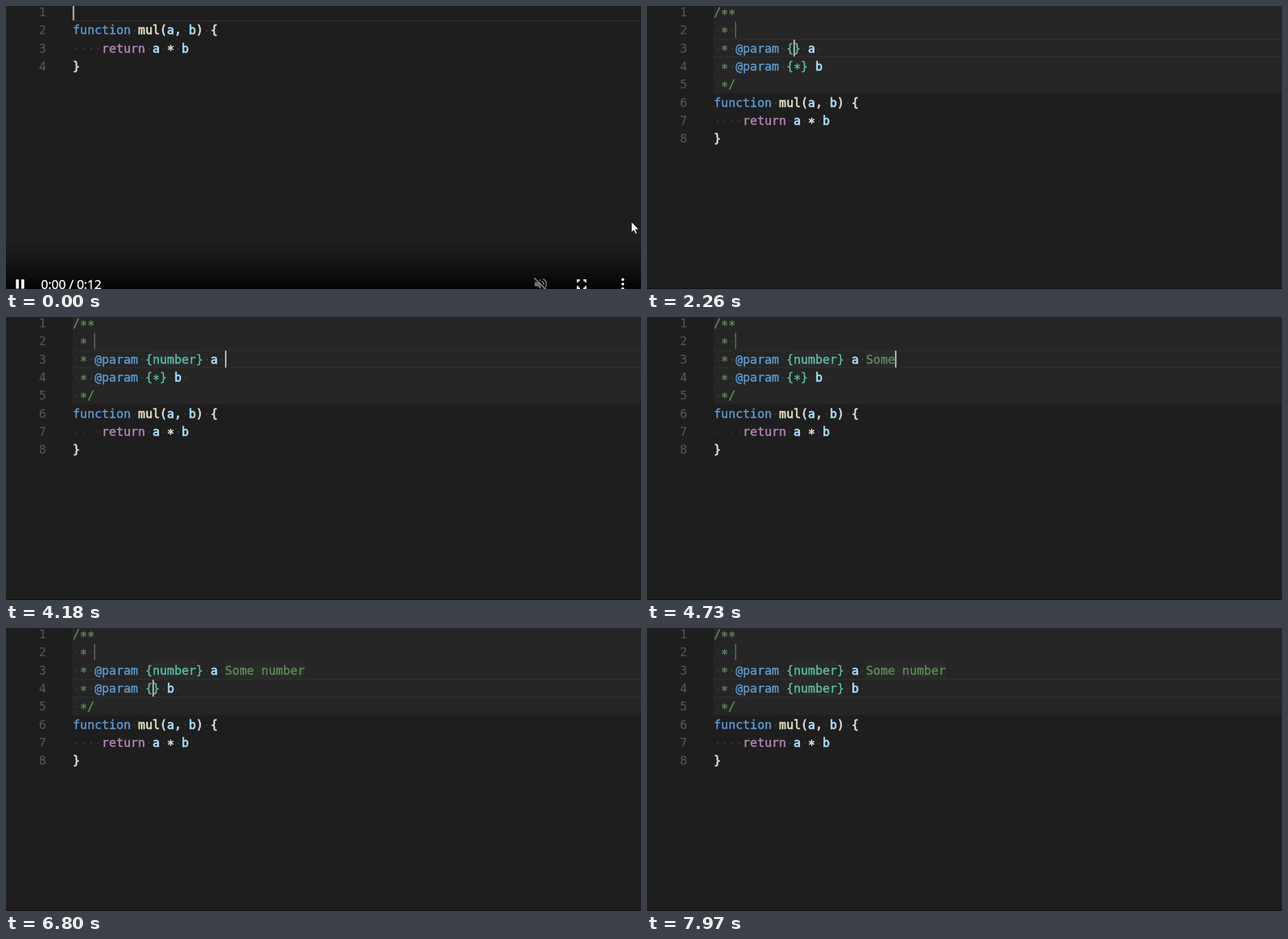
Recreate the animation shown at these times as an HTML page with a canvas. Size 925 by 412 pixels, loop 8000 ms.

```html
<!DOCTYPE html>
<html lang="en">
<head>
<meta charset="utf-8">
<title>Typing a doc comment</title>
<style>
  html, body { margin: 0; width: 100%; height: 100%; overflow: hidden; background: #1e1e1e; }
  canvas { display: block; }
</style>
</head>
<body>
<canvas id="stage" width="925" height="412"></canvas>
<script>
const W = 925, H = 412, LOOP = 8000;
const LEFT = 97, CELL = 10.56, ROW = 26.35, TOP = -4.7;
const MONO = '17.5px "DejaVu Sans Mono", monospace';
const COLOR = {
  key: '#5c97cc', fn: '#dadac0', name: '#a6d8f4', plain: '#d4d4d4', ret: '#af84ae',
  doc: '#5f8757', type: '#5bb8a2', dot: '#404040', num: '#535355',
  label: '#bfbfc2', hit: '#3499d6', blue: '#86bde6', grey: '#8e8e91'
};
const LIST = [
  ['link', 'SVGAnimatedEnumeration'], ['link', 'SVGAnimatedNumber'],
  ['link', 'SVGAnimatedNumberList'], ['link', 'SVGNumber'], ['link', 'SVGNumberList'],
  ['word', 'continue'], ['word', 'enum'], ['cube', 'menubar'], ['word', 'null', 'null'],
  ['word', 'number', 'number'], ['cube', 'oncontextmenu'], ['cube', 'onunload']
];
// Moments of a key press; the caret blink restarts at each.
const KEYS = [0, 220, 320, 420, 1120, 1720, 2200, 2700, 2840, 3220, 3540, 3950, 4330, 4660,
  4970, 5350, 5540, 6090, 6450, 6990, 7110, 7350, 7460];

const ctx = document.getElementById('stage').getContext('2d');
const lineTop = i => TOP + i * ROW;
const colX = c => LEFT + c * CELL;
const between = (t, a, b) => t >= a && t < b;
const ramp = (t, a, b) => Math.min(1, Math.max(0, (t - a) / (b - a)));
const typed = (t, text, start, gap) =>
  text.slice(0, Math.max(0, Math.floor((t - start) / gap) + 1));

function rect(x, y, w, h, fill) {
  ctx.fillStyle = fill;
  ctx.fillRect(x, y, w, h);
}

function shape(points, fill, stroke) {
  ctx.beginPath();
  points.forEach(([x, y]) => ctx.lineTo(x, y));
  ctx.closePath();
  ctx.fillStyle = fill;
  ctx.fill();
  if (stroke) {
    ctx.strokeStyle = stroke;
    ctx.lineWidth = 1;
    ctx.stroke();
  }
}

function disc(x, y, r, fill) {
  ctx.beginPath();
  ctx.arc(x, y, r, 0, Math.PI * 2);
  ctx.fillStyle = fill;
  ctx.fill();
}

// Text on the character grid; weight is a thin outline for brighter tokens.
function put(text, x, base, color, weight = 0.5, dots = false) {
  ctx.font = MONO;
  ctx.lineWidth = weight;
  ctx.lineJoin = 'round';
  [...text].forEach((ch, i) => {
    const cx = x + i * CELL;
    if (ch === ' ') {
      if (dots) rect(cx + 4.5, base - 6.4, 2, 2, COLOR.dot);
      return;
    }
    const y = base + (ch === '*' ? 2.6 : 0);
    ctx.fillStyle = ctx.strokeStyle = color;
    ctx.fillText(ch, cx, y);
    ctx.strokeText(ch, cx, y);
  });
}

function paramLine(type, name, note = '') {
  return [['doc', ' * '], ['key', '@param'], ['doc', ' '], ['type', `{${type}}`],
    ['doc', ' '], ['name', name], ['doc', ' ' + note]];
}

function codeLines() {
  return [
    [['key', 'function'], ['plain', ' '], ['fn', 'mul'], ['plain', '('], ['name', 'a'],
      ['plain', ', '], ['name', 'b'], ['plain', ') {']],
    [['plain', '    '], ['ret', 'return'], ['plain', ' '], ['name', 'a'], ['plain', ' * '], ['name', 'b']],
    [['plain', '}']]
  ];
}

function drawLine(tokens, i) {
  const base = lineTop(i) + 19.6;
  let col = 0;
  for (const [kind, text] of tokens) {
    const bright = kind === 'name' || kind === 'plain' || kind === 'fn';
    put(text, colX(col) + 0.3, base, COLOR[kind], bright ? 0.85 : 0.5, true);
    col += text.length;
  }
  put(String(i + 1), 48, base, COLOR.num, 0.2);
}

function icon(kind, x, y) {
  if (kind === 'link') {
    disc(x + 2.5, y, 2.5, COLOR.blue);
    rect(x + 5, y - 1, 6, 2, COLOR.blue);
    ctx.strokeStyle = COLOR.blue;
    ctx.lineWidth = 2.2;
    ctx.beginPath();
    ctx.arc(x + 13.5, y, 2.9, 0, Math.PI * 2);
    ctx.stroke();
  } else if (kind === 'word') {
    [[0, -7, 10], [13, -7, 4], [0, -3, 6], [9, -3, 4], [0, 1, 11], [13, 1, 5], [0, 5, 6], [9, 5, 8]]
      .forEach(([dx, dy, w]) => rect(x - 1 + dx, y + dy, w, 2, COLOR.grey));
  } else if (kind === 'cube') {
    shape([[x, y - 2], [x + 9, y - 7], [x + 18, y - 3], [x + 8, y + 2]], '#a3d3f2');
    shape([[x, y - 1], [x + 8, y + 3], [x + 8, y + 8], [x, y + 4]], '#79b6de');
    shape([[x + 9, y + 3], [x + 18, y - 2], [x + 18, y + 3], [x + 9, y + 8]], '#8fc6e9');
  } else {
    ctx.strokeStyle = COLOR.label;
    ctx.lineWidth = 1.5;
    ctx.strokeRect(x + 0.5, y - 6.5, 16, 13);
    ctx.fillStyle = COLOR.label;
    ctx.font = 'bold 8px "Liberation Sans", sans-serif';
    ctx.fillText('abc', x + 2, y + 3);
  }
}

function popup(x, y, rows, selected, match, scroll) {
  const w = 643.5, rh = 26.4, h = rows.length * rh + 2;
  rect(x, y, w, h, '#414144');
  rect(x + 1, y + 1, w - 2, h - 2, '#2b2a2e');
  rows.forEach(([kind, label, detail], i) => {
    const top = y + 1 + i * rh, base = top + 19.4;
    if (i === selected) rect(x + 1, top, w - 2, rh, '#103352');
    icon(kind, x + 6, top + rh / 2);
    const at = label.toLowerCase().indexOf(match);
    const end = at + match.length;
    const tx = x + 30;
    put(label.slice(0, at), tx, base, COLOR.label);
    put(label.slice(at, end), tx + at * CELL, base, COLOR.hit, 1.2);
    put(label.slice(end), tx + end * CELL, base, COLOR.label);
    if (detail && i === selected) {
      put(detail, x + w - 15 - detail.length * CELL, base, '#98a3ad', 0.4);
    }
  });
  if (scroll) rect(x + w - 15, y + 153, 14, h - 154, '#4d4d50');
}

function controls(alpha, clock) {
  if (alpha <= 0) return;
  ctx.save();
  ctx.globalAlpha = alpha;
  const shade = ctx.createLinearGradient(0, 342, 0, H);
  shade.addColorStop(0, 'rgba(0,0,0,0)');
  shade.addColorStop(0.5, 'rgba(0,0,0,.32)');
  shade.addColorStop(1, 'rgba(0,0,0,.9)');
  rect(0, 342, W, H - 342, shade);

  rect(14.5, 398, 4.2, 13.5, '#fff');
  rect(22.3, 398, 4.2, 13.5, '#fff');
  const label = clock + ' / 0:12';
  ctx.fillStyle = ctx.strokeStyle = '#f4f4f4';
  ctx.font = '18.2px "Open Sans", "Noto Sans", sans-serif';
  ctx.lineWidth = 0.5;
  ctx.fillText(label, 51, 411.5);
  ctx.strokeText(label, 51, 411.5);

  // Muted speaker
  shape([[770, 402], [774, 402], [779, 397], [779, 412], [774, 408], [770, 408]], '#6d6d6d');
  ctx.strokeStyle = '#6d6d6d';
  ctx.lineWidth = 2;
  ctx.beginPath();
  ctx.arc(779, 404.5, 4, -1.2, 1.2);
  ctx.moveTo(782.5, 397);
  ctx.arc(779, 404.5, 8, -1.1, 1.1);
  ctx.stroke();
  ctx.strokeStyle = '#111';
  ctx.beginPath();
  ctx.moveTo(771, 395);
  ctx.lineTo(788, 412);
  ctx.stroke();
  ctx.strokeStyle = '#777';
  ctx.beginPath();
  ctx.moveTo(769.5, 396);
  ctx.lineTo(787, 413);
  ctx.stroke();

  // Full-screen corners
  ctx.strokeStyle = '#fff';
  ctx.lineWidth = 2.2;
  ctx.lineJoin = 'miter';
  for (const sx of [-1, 1]) for (const sy of [-1, 1]) {
    ctx.beginPath();
    ctx.moveTo(838.5 + sx * 2.6, 405 + sy * 5.8);
    ctx.lineTo(838.5 + sx * 5.8, 405 + sy * 5.8);
    ctx.lineTo(838.5 + sx * 5.8, 405 + sy * 2.6);
    ctx.stroke();
  }
  [398.2, 404.8, 411.4].forEach(y => disc(898.5, y, 2, '#fff'));
  ctx.restore();
}

function pointer(x, y) {
  shape([[x, y], [x, y + 15.5], [x + 3.5, y + 12.5], [x + 6, y + 18], [x + 8.4, y + 17],
    [x + 6, y + 11.5], [x + 10.8, y + 11.2]], '#fff', '#111');
}

function caretPlace(t, s) {
  if (t < 1120) return [0, s.open.length];
  if (t < 1720) return [1, 3];
  if (t < 3950) return [2, 11 + s.typeA.length];
  if (t < 6090) return [2, 15 + s.typeA.length + s.note.length];
  if (t < 7460) return [3, 11 + s.typeB.length];
  return [3, 15 + s.typeB.length];
}

function paramType(t, clear, start, gap, accept) {
  if (t < clear) return '*';
  return t < accept ? typed(t, 'nu', start, gap) : 'number';
}

function draw(t) {
  const s = {
    open: typed(t, '/**', 220, 100),
    typeA: paramType(t, 2200, 2700, 140, 3540),
    typeB: paramType(t, 6450, 6990, 120, 7350),
    note: typed(t, 'Some', 4330, 110) + typed(t, ' number', 4970, 95)
  };
  const expanded = t >= 1120;
  const [row, col] = caretPlace(t, s);

  rect(0, 0, W, H, '#1e1e1f');
  if (expanded) {
    rect(LEFT, 0, W - LEFT, lineTop(5), '#252526');
    if (s.typeA === 'number') rect(colX(11), lineTop(2), CELL * 6, ROW, '#2a2a2b');
    if (s.typeB === 'number') rect(colX(11), lineTop(3), CELL * 6, ROW, '#2a2a2b');
    rect(colX(15 + s.typeA.length), lineTop(2), s.note.length * CELL, ROW, '#2a2a2b');
  }

  // Current line frame
  rect(LEFT, Math.round(lineTop(row)), W - LEFT, 1.5, '#2e2e2f');
  rect(LEFT, Math.round(lineTop(row + 1)) - 1, W - LEFT, 1.5, '#2e2e2f');

  // Selected placeholder after a tab
  if (between(t, 1720, 2200) || between(t, 6090, 6450)) {
    rect(colX(11), lineTop(row), CELL, ROW, '#264f78');
  }

  const lines = expanded
    ? [[['doc', '/**']], [['doc', ' * ']], paramLine(s.typeA, 'a', s.note),
      paramLine(s.typeB, 'b'), [['doc', ' */']], ...codeLines()]
    : [[['doc', s.open]], ...codeLines()];
  lines.forEach(drawLine);

  if (t >= 1720) rect(colX(3) - 0.6, lineTop(1) + 1.5, 2, 23.5, '#5c5c5c');

  const last = KEYS.filter(k => k <= t).pop();
  if ((t - last) % 1000 < 500) {
    rect(colX(col) + 0.2, lineTop(row) + 1, 2.2, 24.5, '#bcbcbc');
  }

  if (between(t, 500, 1120)) popup(146, 21, [['abc', '/** */', 'JSDoc comment']], 0, '/**');
  if (between(t, 2880, 3540)) popup(235, 75, LIST, t < 3220 ? 8 : 9, 'nu', true);
  if (between(t, 5180, 5850)) popup(398.5, 75.5, [['abc', 'number']], 0, 'nu');
  if (between(t, 7150, 7350)) popup(235, 101.5, LIST, 9, 'nu', true);

  rect(0, 411, W, 1, '#150d0e');
  controls(1 - ramp(t, 60, 500), '0:00');
  controls(ramp(t, 2600, 2780) * (1 - ramp(t, 3460, 3800)), '0:01');
  if (t < 300) pointer(911, 314);
}

const start = performance.now();
function tick() {
  draw((performance.now() - start) % LOOP);
  requestAnimationFrame(tick);
}
tick();
</script>
</body>
</html>
```
